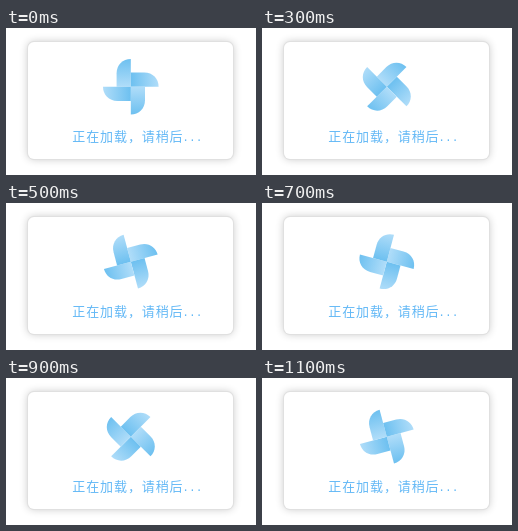
An HTML page that plays this animation: 250 by 147 pixels, repeating every 1200 ms.

```html
<!DOCTYPE html>
<html lang="zh-CN">
<head>
<meta charset="utf-8">
<title>正在加载</title>
<style>
  html, body { margin: 0; width: 100%; height: 100%; overflow: hidden; background: #fff; }
  svg { position: absolute; left: 0; top: 0; }
  .card {
    position: absolute; left: 22px; top: 14px; width: 205px; height: 117px;
    border-radius: 6px; background: #fff;
    box-shadow: 0 0 0 1px #e0e0e0, 0 0 8px rgba(0, 0, 0, .24);
  }
  text { font: 13px "Noto Sans CJK SC", "Noto Sans CJK", sans-serif; letter-spacing: .9px; fill: #62b8f6; }
  .dots { font: 11.2px "Liberation Mono", monospace; letter-spacing: 0; }
</style>
</head>
<body>
<div class="card"></div>
<svg width="250" height="147" viewBox="0 0 250 147">
  <defs>
    <linearGradient id="paleTip" gradientUnits="userSpaceOnUse" x1="0" y1="0" x2="0" y2="-28">
      <stop offset="0" stop-color="#6dc0f0"/>
      <stop offset="1" stop-color="#b0ddf9"/>
    </linearGradient>
    <linearGradient id="deepTip" gradientUnits="userSpaceOnUse" x1="0" y1="-28" x2="0" y2="0">
      <stop offset="0" stop-color="#6dc0f0"/>
      <stop offset="1" stop-color="#b0ddf9"/>
    </linearGradient>
    <path id="blade" d="M0 0V-27.8C-8 -27.8 -14.2 -22 -14.2 -13.5V0Z"/>
  </defs>
  <g id="wheel">
    <use href="#blade" fill="url(#deepTip)"/>
    <use href="#blade" fill="url(#paleTip)" transform="rotate(90)"/>
    <use href="#blade" fill="url(#deepTip)" transform="rotate(180)"/>
    <use href="#blade" fill="url(#paleTip)" transform="rotate(270)"/>
  </g>
  <text x="66.3" y="112.7">正在加载，请稍后<tspan class="dots" dx="-1.3">...</tspan></text>
</svg>
<script>
  const wheel = document.getElementById('wheel');
  const stepMs = 100, steps = 12, stepAngle = 15;
  const start = performance.now();

  function draw() {
    const step = Math.floor((performance.now() - start) / stepMs) % steps;
    wheel.setAttribute('transform', `translate(124.8 58.7) rotate(${step * stepAngle})`);
    requestAnimationFrame(draw);
  }
  draw();
</script>
</body>
</html>
```
